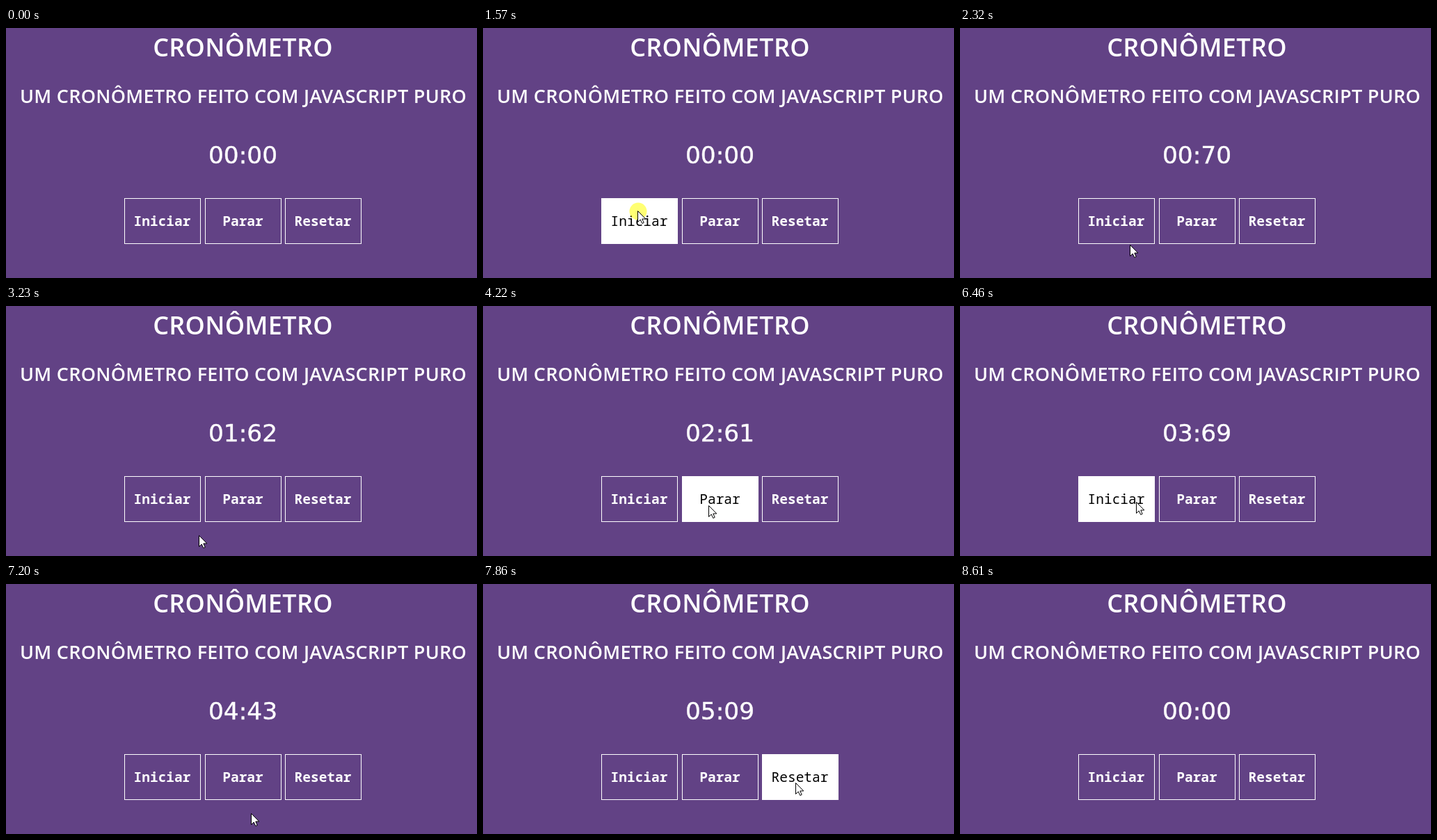
An HTML page for the animation above (9270 ms loop, 677 px wide and 360 px high).

```html
<!DOCTYPE html>
<html lang="pt-BR">
<head>
<meta charset="utf-8">
<title>Cronômetro</title>
<style>
  html, body { margin: 0; width: 100%; height: 100%; overflow: hidden; background: #624285; }
  svg { display: block; width: 677px; height: 360px; }
  text { fill: #fff; text-anchor: middle; font-kerning: none; }
  .title { font: 600 36px "Open Sans", "Noto Sans", sans-serif; letter-spacing: .3px; }
  .sub { font: 600 27px "Open Sans", "Noto Sans", sans-serif; letter-spacing: .28px; }
  .time { font: 34.4px "DejaVu Sans", sans-serif; stroke: #fff; stroke-width: .4px; }
  .btn rect { fill: none; stroke: #fff; }
  .btn text { font: 600 19.5px "Noto Sans Mono", "DejaVu Sans Mono", monospace; }
  .btn.on rect { fill: #fff; }
  .btn.on text { fill: #000; font-weight: 400; }
</style>
</head>
<body>
<svg viewBox="0 0 677 360">
  <text class="title" x="340.5" y="41">CRONÔMETRO</text>
  <text class="sub" x="341" y="108">UM CRONÔMETRO FEITO COM JAVASCRIPT PURO</text>
  <text class="time" id="time" x="340.5" y="194.5">00:00</text>
  <g id="buttons"></g>
  <g id="cursor">
    <circle id="halo" r="12.5" fill="#ff0" fill-opacity=".55"/>
    <path id="arrow" d="M-.5 -.5V15.5L3.2 12L5.8 17.5L8.2 16.4L5.8 11H10.8Z" fill="#fff" stroke="#000"/>
    <path id="beam" d="M-4 -7.5H-1M1 -7.5H4M-4 7.5H-1M1 7.5H4M.5 -7V7" fill="none" stroke="#b5a8c0"/>
  </g>
</svg>
<script>
const LOOP = 9270, ORIGIN = 1570, TICK = 82.75;
const BOX = { y: 245, w: 110, h: 66, gap: 5.5 };

// Pointer moves in ticks; it rests between them
const ENTRY = { x: 580, y: 366 };
const MOVES = [
  { from: -18, to: -9, x: 223, y: 264 },
  { from: 5, to: 12, x: 252, y: 330 },
  { from: 12, to: 20, x: 278, y: 331 },
  { from: 20, to: 34, x: 327, y: 286 },
  { from: 41, to: 48, x: 254, y: 283 },
  { from: 64, to: 68, x: 353, y: 331 },
  { from: 68, to: 71, x: 395, y: 343 },
  { from: 71, to: 76, x: 450, y: 287 },
  { from: 79, to: 85, x: 474, y: 366 }
];
const CLICKS = { start: 0, stop: 39, resume: 53, reset: 78 };

const $ = id => document.getElementById(id);
const show = (el, on) => el.style.display = on ? "" : "none";
const clamp = v => Math.min(1, Math.max(0, v));
const easeOut = k => 1 - (1 - k) ** 1.6;

function makeButton(label, i) {
  const x = Math.round(170 + i * (BOX.w + BOX.gap));
  $("buttons").insertAdjacentHTML("beforeend", `<g class="btn">
    <rect x="${x + .5}" y="${BOX.y + .5}" width="${BOX.w - 1}" height="${BOX.h - 1}"/>
    <text x="${x + BOX.w / 2 - .5}" y="285">${label}</text></g>`);
  return { x, el: $("buttons").lastElementChild };
}
const buttons = ["Iniciar", "Parar", "Resetar"].map(makeButton);

function pointer(n) {
  let { x, y } = ENTRY;
  for (const m of MOVES) {
    const k = easeOut(clamp((n - m.from) / (m.to - m.from)));
    x += (m.x - x) * k;
    y += (m.y - y) * k;
  }
  return { x: Math.round(x), y: Math.round(y) };
}

function elapsed(n) {
  if (n <= CLICKS.start || n > CLICKS.reset) return 0;
  const t = ORIGIN + n * TICK;
  return Math.min(t - 1605, 3270) + Math.max(0, t - 6030);
}

function format(ms) {
  const c = Math.floor(ms / 10);
  return [c / 100, c % 100].map(v => String(Math.floor(v)).padStart(2, "0")).join(":");
}

function draw(n) {
  const { x, y } = pointer(n);
  const inRow = y >= BOX.y && y < BOX.y + BOX.h;
  const beam = inRow && x > 280 && x < 286;
  $("time").textContent = format(elapsed(n));
  for (const b of buttons)
    b.el.classList.toggle("on", inRow && x >= b.x - 2 && x < b.x + BOX.w + 2);
  $("cursor").setAttribute("transform", `translate(${x} ${y})`);
  show($("halo"), Object.values(CLICKS).includes(n));
  show($("arrow"), !beam);
  show($("beam"), beam);
}

const start = performance.now();
let last = null;
function frame() {
  const t = (performance.now() - start) % LOOP;
  const n = Math.floor((t - ORIGIN) / TICK + .06);
  if (n !== last) draw(last = n);
  requestAnimationFrame(frame);
}
frame();
</script>
</body>
</html>
```
